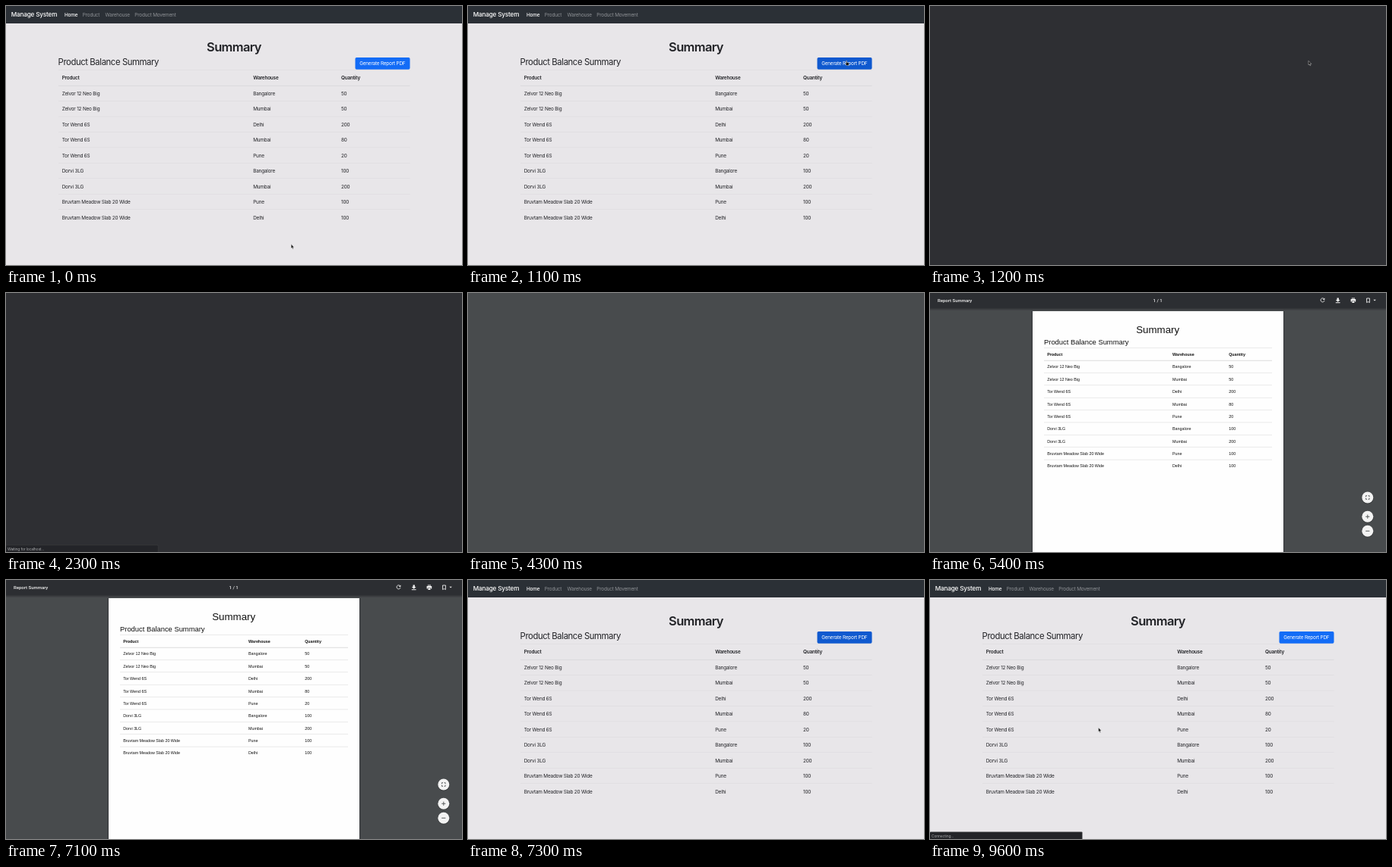
An HTML page that plays this animation: 600x342 px, repeating every 9.7 s.

```html
<!DOCTYPE html>
<html lang="en">
<head>
<meta charset="utf-8">
<title>Product balance report</title>
<style>
  html, body { margin: 0; width: 100%; height: 100%; overflow: hidden; background: #2e2f33; }
  svg { display: block; width: 100%; height: 100%; }
  .ui { font: 400 6.4px Inter, sans-serif; letter-spacing: -.03em; fill: #212226; }
  .paper { font: 400 5.35px "Liberation Sans", sans-serif; fill: #111; }
  .toolbar { font: 500 6px Roboto, sans-serif; fill: #f1f1f1; }
  .head { font-weight: 600; }
  .paper .head { font-weight: 700; }
  .mid { text-anchor: middle; }
  .icon { fill: none; stroke: #f1f1f1; stroke-width: .9; }
</style>
</head>
<body>
<svg id="stage" viewBox="0 0 600 342" preserveAspectRatio="none"></svg>
<script>
const LOOP = 9700, STEP = 100;
const BUTTON = { x: 459.5, y: 68, w: 72, h: 15.7 };

const stock = [
  ['Zelvor 12 Neo Big', 'Bangalore', 50],
  ['Zelvor 12 Neo Big', 'Mumbai', 50],
  ['Tor Wend 6S', 'Delhi', 200],
  ['Tor Wend 6S', 'Mumbai', 80],
  ['Tor Wend 6S', 'Pune', 20],
  ['Dorvi 3LG', 'Bangalore', 100],
  ['Dorvi 3LG', 'Mumbai', 200],
  ['Bruvtam Meadow Slab 20 Wide', 'Pune', 100],
  ['Bruvtam Meadow Slab 20 Wide', 'Delhi', 100]
];

const text = (x, y, value, attrs = '') => `<text x="${x}" y="${y}" ${attrs}>${value}</text>`;
const rect = (x, y, w, h, fill, attrs = '') =>
  `<rect x="${x}" y="${y}" width="${w}" height="${h}" fill="${fill}" ${attrs}/>`;

function table({ columns, left, right, top, headY, firstY, pitch, ruleY, line }) {
  const cells = (values, y, attrs) => values.map((v, i) => text(columns[i], y, v, attrs)).join('');
  const rule = (y, h) => rect(left, y, right - left, h, line);
  return rule(top, .5) + rule(ruleY, .8) +
    cells(['Product', 'Warehouse', 'Quantity'], headY, 'class="head"') +
    stock.map((row, i) => cells(row, firstY + i * pitch) +
      (i ? rule(ruleY + i * pitch, .5) : '')).join('');
}

const home = `<g id="home" class="ui">
  ${rect(0, 0, 600, 342, '#e8e6e9')}${rect(0, 0, 600, 23, '#2b3036')}
  ${text(6.8, 14.2, 'Manage System', 'fill="#fff" font-weight="500" font-size="8.2"')}
  ${text(77, 13.6, 'Home', 'fill="#fff" font-weight="500"')}
  <g fill="#8f9296">
    ${text(100.8, 13.6, 'Product')}${text(130.5, 13.6, 'Warehouse')}${text(169.3, 13.6, 'Product Movement')}
  </g>
  ${text(300, 60.2, 'Summary', 'class="mid head" font-size="16.4" letter-spacing="-.6"')}
  ${text(68.6, 78.4, 'Product Balance Summary', 'font-size="11.3" letter-spacing="-.4"')}
  <g id="button">
    ${rect(BUTTON.x, BUTTON.y, BUTTON.w, BUTTON.h, 'inherit', 'rx="1.8"').replace('fill="inherit" ', '')}
    ${text(495.3, 78.2, 'Generate Report PDF', 'class="mid" fill="#fff"')}
  </g>
  ${table({ columns: [73.7, 325.2, 441], left: 69, right: 531.5, top: 84.3,
    headY: 97.2, firstY: 118, pitch: 20.44, ruleY: 104.9, line: '#d8d6da' })}
</g>`;

const zoomButton = (y, glyph) => `<g transform="translate(575.8 ${y})">
  <circle cy=".7" r="7.8" fill="#000" opacity=".2"/><circle r="7.5" fill="#f3f3f3"/>
  <path d="${glyph}" fill="none" stroke="#4b4e50" stroke-width=".9"/></g>`;

const viewer = `<g id="viewer">
  ${rect(0, 0, 600, 342, '#484b4d')}
  <g id="report" class="paper">
    ${rect(133.8, 24, 332.4, 318, '#393b3d')}${rect(135, 24, 330, 318, '#fefefe')}
    <g id="reportText">
      ${text(299.7, 52.6, 'Summary', 'class="mid" font-size="13.3"')}
      ${text(150, 67.6, 'Product Balance Summary', 'font-size="9.4"')}
      ${table({ columns: [154.2, 319, 393.2], left: 150, right: 450, top: 72.2,
        headY: 82.5, firstY: 99.4, pitch: 16.38, ruleY: 88.8, line: '#d4d4d4' })}
    </g>
  </g>
  <g id="toolbar" class="toolbar">
    ${rect(0, 20, 600, 2.5, '#3b3d40')}${rect(0, 0, 600, 20.5, '#2c2e32')}
    ${text(10, 11.6, 'Report Summary')}${text(299.7, 11.6, '1 / 1', 'class="mid"')}
    <path class="icon" d="M518.6 7.9A2.5 2.5 0 1 0 519 10"/><path d="M519.4 6.4V9H516.8Z"/>
    <path d="M535.5 6.5h2.4v2.4h1.7l-2.9 2.9-2.9-2.9h1.7ZM533.8 12.3h5.8v.9h-5.8Z"/>
    <path d="M554.8 6.4h4.2v1.2h-4.2ZM553.6 8.1h6.6v3.4h-1.3v-1.3h-4v1.3h-1.3ZM555.4 10.7h3v2.3h-3Z"/>
    <path class="icon" d="M574.6 7h3.8v5.6l-1.9-1-1.9 1Z"/><path d="M583.4 8.8h3.4l-1.7 1.8Z"/>
  </g>
  <g id="zoom">
    ${zoomButton(270, 'M-2.3 -.8V-2.3H-.8M.8 -2.3H2.3V-.8M2.3 .8V2.3H.8M-.8 2.3H-2.3V.8')}
    ${zoomButton(295.3, 'M-2.6 0H2.6M0 -2.6V2.6')}
    ${zoomButton(314.3, 'M-2.6 0H2.6')}
  </g>
</g>`;

const overlay = `<g id="status" class="ui">
    ${rect(0, 332.6, 200.5, 10, '#37383b', 'rx="1"')}${rect(0, 333.2, 199.8, 9, '#232428', 'rx="1"')}
    <text id="statusText" x="2" y="339.5" font-size="5" fill="#a5a6a8"></text>
  </g>
  <g id="cursor" fill="#111" stroke="#f4f4f4" stroke-width=".4" stroke-linejoin="round">
    <path id="arrow" d="M0 0V5.4L1.2 4.4 2.1 6.4 3 6 2.2 4.1H3.9Z"/>
    <path id="hand" d="M-.5 0Q0 -.6 .5 0V2L3 2.5Q3.5 2.8 3.4 3.6L2.8 6H0L-1.7 3.7Q-1.4 3 -.5 3.6Z"/>
  </g>`;

const $ = id => document.getElementById(id);
$('stage').innerHTML = rect(0, 0, 600, 342, '#2e2f33') + home + viewer + overlay;

const show = (id, on) => $(id).setAttribute('display', on ? 'inline' : 'none');
const between = (t, from, to) => t >= from && t < to;

// time, x, y: the pointer eases from each stop to the next
const stops = [
  [100, 375.2, 314.6], [1000, 498, 72.4], [8300, 498, 72.4],
  [9200, 458.5, 84], [9600, 221.6, 195]
];

function pointerAt(t) {
  const next = stops.findIndex(s => s[0] > t);
  if (next < 1) return (next ? stops.at(-1) : stops[0]).slice(1);
  const [a, b] = [stops[next - 1], stops[next]];
  const p = (t - a[0]) / (b[0] - a[0]), k = p * p * (3 - 2 * p);
  return [a[1] + (b[1] - a[1]) * k, a[2] + (b[2] - a[2]) * k];
}

function statusAt(t) {
  if (between(t, 1600, 1900) || t >= 8700) return 'Connecting...';
  return between(t, 1900, 4200) ? 'Waiting for localhost...' : '';
}

function draw(t) {
  const atHome = t < 1200 || t >= 7300;
  const [x, y] = pointerAt(t);
  const hover = atHome && x >= BUTTON.x && x <= BUTTON.x + BUTTON.w &&
    y >= BUTTON.y && y <= BUTTON.y + BUTTON.h;
  const status = statusAt(t);

  show('home', atHome);
  show('viewer', between(t, 4200, 7300));
  show('zoom', t >= 5100);
  show('toolbar', t >= 5300);
  show('report', t >= 5300);
  show('reportText', t >= 5400);
  show('status', status);
  $('statusText').textContent = status;

  $('button').setAttribute('fill', hover ? '#0f59cf' : '#136cf6');
  $('button').setAttribute('text-decoration', hover ? 'underline' : 'none');

  show('cursor', t < 2300 || t >= 7400);
  show('arrow', !hover);
  show('hand', hover);
  $('cursor').setAttribute('transform', `translate(${x} ${y})`);
}

const start = performance.now();
function tick() {
  const t = (performance.now() - start) % LOOP;
  draw(Math.floor(t / STEP) * STEP);
  requestAnimationFrame(tick);
}
tick();
</script>
</body>
</html>
```
